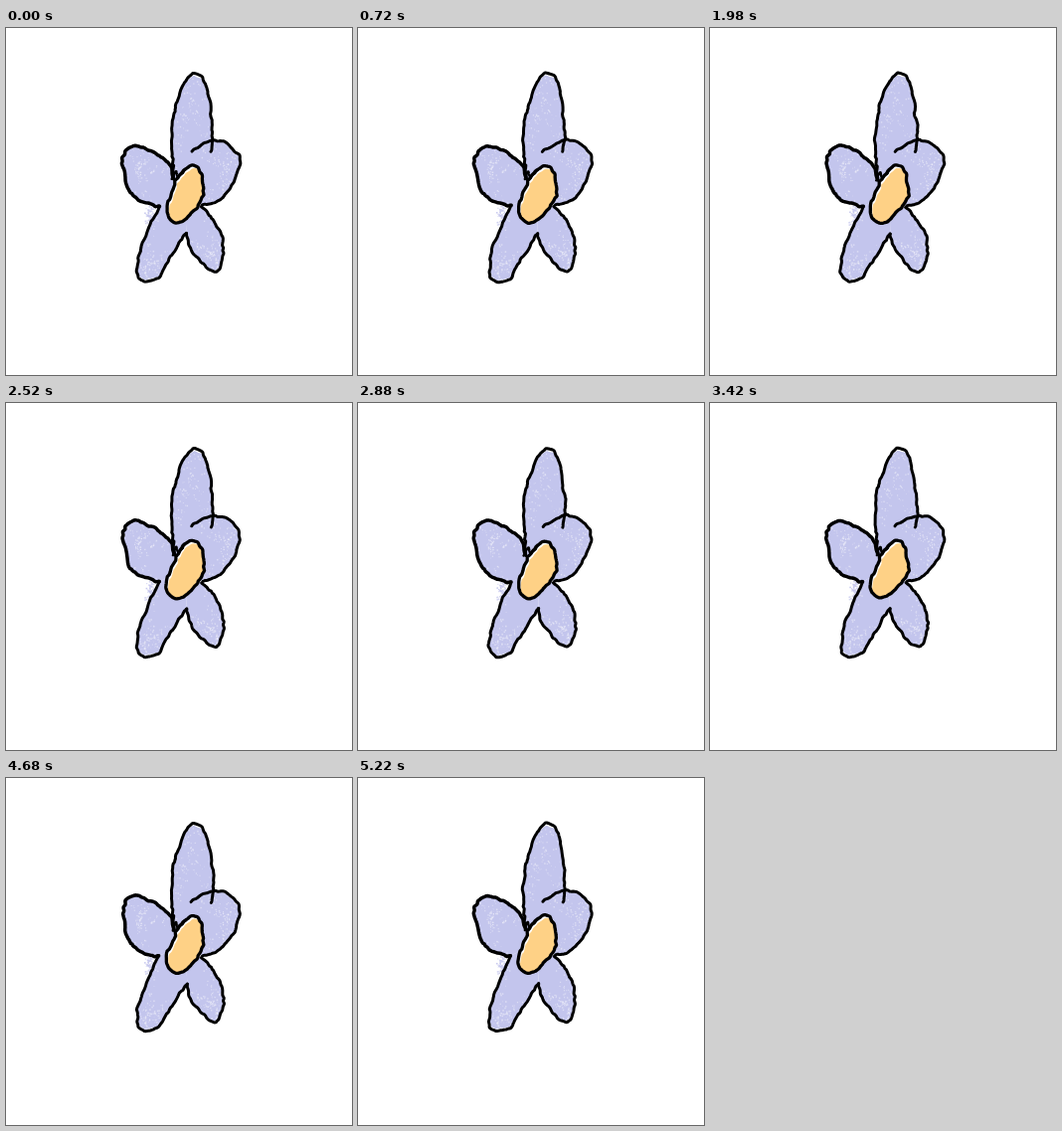
Recreate the animation shown at these times as an HTML page with a canvas. Size 348 px wide and 349 px high, loop 5400 ms.

```html
<!DOCTYPE html>
<html lang="en">
<head>
<meta charset="utf-8">
<title>Wobbling flower</title>
<style>
  html, body { margin: 0; width: 100%; height: 100%; overflow: hidden; background: #fff; }
  canvas { display: block; width: 348px; height: 349px; }
</style>
</head>
<body>
<canvas id="stage" width="348" height="349"></canvas>
<script>
const LOOP = 5400, STEP = 180;
const LILAC = '#c3c5ed', YELLOW = '#fed186', INK = '#000';
const HEART = [180, 166];
const ctx = document.getElementById('stage').getContext('2d');

// Key points of each outline; curves and rough edges are added by rule.
const curve = text => smooth(text.split(' ').map(pair => pair.split(',').map(Number)));

const petals = {
  top: curve('169,150 166,115 171,78 185,48 200,54 208,100 206,125'),
  right: curve('186,124 208,113 228,120 235,135 226,160 213,174 198,179'),
  left: curve('169,152 162,135 136,119 121,123 118,141 129,170 154,180'),
  lowerLeft: curve('154,180 136,220 132,246 138,254 153,252 161,238 181,207'),
  lowerRight: curve('181,207 187,224 205,244 214,242 219,227 215,203 197,180')
};
const core = curve('172,151 188,138 198,150 197,174 175,196 161,184 172,151');
const tuft = curve('167,153 171,145 173,150 181,143');

function smooth(list) {
  const out = [];
  const samples = 16;
  for (let i = 0; i < list.length - 1; i++) {
    const b = list[i], c = list[i + 1];
    const a = list[i - 1] || b, d = list[i + 2] || c;
    for (let n = 0; n < samples; n++) {
      const t = n / samples;
      out.push([0, 1].map(k => b[k] + 0.5 * t * (c[k] - a[k]
        + t * (2 * a[k] - 5 * b[k] + 4 * c[k] - d[k]
        + t * (3 * (b[k] - c[k]) + d[k] - a[k])))));
    }
  }
  out.push(list[list.length - 1]);
  return out;
}

function hash(a, b, c) {
  const v = Math.sin(a * 127.1 + b * 311.7 + c * 74.7) * 43758.5453;
  return v - Math.floor(v);
}

// Smooth value noise in -1..1
function noise(x, y, seed) {
  const i = Math.floor(x), j = Math.floor(y);
  const ease = t => t * t * (3 - 2 * t);
  const mix = (a, b, t) => a + (b - a) * t;
  const u = ease(x - i), v = ease(y - j);
  const row = k => mix(hash(i, k, seed), hash(i + 1, k, seed), u);
  return mix(row(j), row(j + 1), v) * 2 - 1;
}

// A fixed rough edge plus a wobble that is new in every pose
function warp([x, y], pose) {
  const shift = axis => 0.9 * noise(x / 3.5, y / 3.5, 90 + axis)
    + noise(x / 11, y / 11, pose * 2 + axis);
  return [x + shift(1), y + shift(2)];
}

const toward = (p, q, t) => p.map((v, k) => v + (q[k] - v) * t);
const middle = line => [0, 1].map(k => line.reduce((sum, p) => sum + p[k], 0) / line.length);

// Bare paper grain, densest at the edges of the petals
const grain = Object.values(petals).flatMap((line, s) =>
  Array.from({ length: 130 }, (_, i) => {
    const edge = line[Math.floor(hash(i, s, 1) * line.length)];
    return { at: toward(edge, middle(line), 0.9 * hash(i, s, 2) ** 1.4), size: 0.6 + hash(i, s, 3) };
  }));

// Colour brushed past the outline beside the left petals
const spill = Array.from({ length: 70 }, (_, i) => ({
  at: [145 + 8 * (hash(i, 7, 1) - 0.5), 189 + 18 * (hash(i, 7, 2) - 0.5)],
  size: 0.8 + hash(i, 7, 3)
}));

function trace(list, pose) {
  const path = new Path2D();
  list.forEach(p => path.lineTo(...warp(p, pose)));
  return path;
}

function specks(list, color, alpha, pose) {
  ctx.fillStyle = color;
  ctx.globalAlpha = alpha;
  for (const { at, size } of list) {
    const [x, y] = warp(at, pose);
    ctx.fillRect(x - size / 2, y - size / 2, size, size);
  }
  ctx.globalAlpha = 1;
}

function fill(shape, color) {
  ctx.fillStyle = color;
  ctx.fill(shape);
}

function ink(list, width, pose) {
  ctx.strokeStyle = INK;
  ctx.lineWidth = width;
  ctx.stroke(trace(list, pose));
}

function drawCore(pose) {
  const shape = trace(core, pose);
  ctx.save();
  ctx.clip(shape);
  fill(shape, '#fff');
  ctx.translate(2, 3);
  fill(shape, YELLOW);
  ctx.restore();
}

function draw(pose) {
  ctx.fillStyle = '#fff';
  ctx.fillRect(0, 0, 348, 349);
  ctx.lineCap = ctx.lineJoin = 'round';

  const lines = Object.values(petals);
  specks(spill, LILAC, 0.7, pose);
  for (const line of lines) {
    const inset = line.map(p => toward(p, HEART, 0.02));
    fill(trace([...inset, HEART], pose), LILAC);
  }
  specks(grain, '#fff', 0.4, pose);
  drawCore(pose);

  lines.forEach(line => ink(line, line === petals.left ? 3.5 : 3, pose));
  ink(core, 3.3, pose);
  ink(tuft, 2.4, pose);
}

let shown = -1;
function tick() {
  const pose = Math.floor((performance.now() % LOOP) / STEP);
  if (pose !== shown) draw(shown = pose);
  requestAnimationFrame(tick);
}
tick();
</script>
</body>
</html>
```
